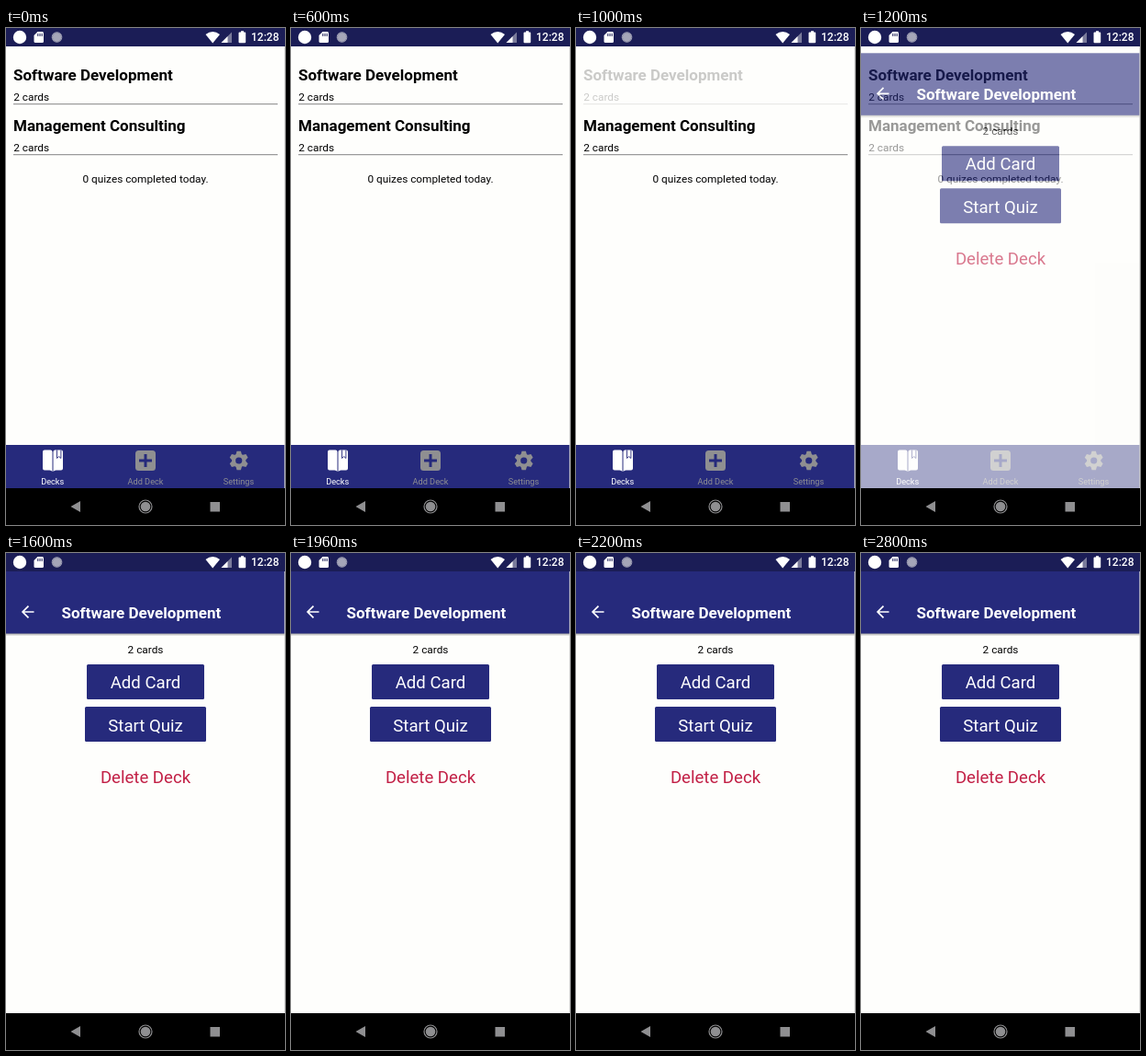
An HTML page that plays this animation: 304 by 540 pixels, repeating every 3200 ms.

```html
<!DOCTYPE html>
<html lang="en">
<head>
<meta charset="utf-8">
<title>Flashcard decks</title>
<style>
  html, body { margin: 0; width: 100%; height: 100%; overflow: hidden; background: #fefefc; }
  svg { display: block; width: 100vw; height: 100vh; }
  text { font-family: Roboto, sans-serif; font-size: 11.82px; }
  .title { font-size: 17px; font-weight: 700; }
  .button { font-size: 18.58px; }
  .tab { font-size: 9.2px; }
  .clock { font-size: 12px; font-weight: 500; }
  .mid { text-anchor: middle; }
  .white { fill: #fff; }
  .navy { fill: #262a7c; }
  .gray { fill: #8f8f91; }
</style>
</head>
<body>
<svg viewBox="0 0 304 540">
  <defs>
    <linearGradient id="shade" x2="0" y2="1">
      <stop stop-color="#000" stop-opacity=".38"/>
      <stop offset="1" stop-color="#000" stop-opacity="0"/>
    </linearGradient>
  </defs>

  <g id="home">
    <rect width="304" height="540" fill="#fefefc"/>
    <g id="pressed">
      <text class="title" x="8" y="57">Software Development</text>
      <text x="8.3" y="79.2">2 cards</text>
      <rect x="8" y="82" width="288" height="1.2" fill="#999"/>
    </g>
    <text class="title" x="8" y="112">Management Consulting</text>
    <text x="8.3" y="134.2">2 cards</text>
    <rect x="8" y="137" width="288" height="1.2" fill="#999"/>
    <text class="mid" x="152" y="168">0 quizes completed today.</text>

    <rect class="navy" y="453" width="304" height="47"/>
    <g class="white">
      <path d="M40 460.5q0-2 2-2H48.5q2 0 2 2V482q-1-1.6-3-1.6H42q-2 0-2-2z"/>
      <path d="M51.5 460.5q0-2 2-2H60q2 0 2 2V478.400q0 2-2 2H54.500q-2 0-3 1.600z"/>
      <text class="tab mid" x="50.700" y="496">Decks</text>
    </g>
    <path d="M55.500 458.500V467.500l2.200-2 2.200 2V458.500" fill="none" stroke="#262a7c" stroke-width=".9"/>
    <g class="gray">
      <rect x="141" y="459" width="22" height="22" rx="3.500"/>
      <text class="tab mid" x="152" y="496">Add Deck</text>
      <g id="gear" transform="translate(253.700 470)"><circle r="7.600"/></g>
      <text class="tab mid" x="253.500" y="496">Settings</text>
    </g>
    <path d="M145 470H159M152 463V477" stroke="#262a7c" stroke-width="3"/>
    <circle class="navy" cx="253.700" cy="470" r="3.600"/>
  </g>

  <g id="deck">
    <rect y="20" width="304" height="487" fill="#fefefc"/>
    <rect y="87" width="304" height="3.500" fill="url(#shade)"/>
    <rect class="navy" y="20" width="304" height="67.500"/>
    <path d="M30.500 64H18.500M24.500 57.600L18.100 64L24.500 70.400" fill="none" stroke="#fff" stroke-width="1.700"/>
    <text class="title white" x="60.500" y="70.700">Software Development</text>
    <text class="mid" x="152" y="108.700">2 cards</text>
    <rect class="navy" x="88" y="121" width="128" height="38" rx="1.500"/>
    <text class="button white mid" x="152" y="147">Add Card</text>
    <rect class="navy" x="86" y="167" width="132" height="38" rx="1.500"/>
    <text class="button white mid" x="152" y="194">Start Quiz</text>
    <text class="button mid" x="152" y="250" fill="#c22046">Delete Deck</text>
  </g>

  <rect x="303.300" y="20" width=".7" height="480" fill="#d4d4d4"/>

  <rect width="304" height="20" fill="#1b1d56"/>
  <g class="white">
    <circle cx="15" cy="10" r="7.200"/>
    <path d="M34.500 4H39.500q1.500 0 1.500 1.500V14.500q0 1.500-1.500 1.500H32q-1.500 0-1.500-1.500V8z"/>
    <path d="M217.500 7Q225.200 1.200 233 7L225.200 16.500z"/>
    <path d="M253.500 5.500q0-1 1-1H256V3.200H259V4.500H260.200q1 0 1 1V15.200q0 1-1 1H254.500q-1 0-1-1z"/>
    <text class="clock" x="267" y="14.300">12:28</text>
  </g>
  <path d="M34.800 6V9M37 6V9M39.200 6V9" stroke="#1b1d56"/>
  <circle cx="55.500" cy="10" r="5.800" fill="#a5a6b8"/>
  <circle cx="55.500" cy="10" r="5" fill="none" stroke="#737597" stroke-dasharray="1.200 1"/>
  <path d="M246 4.500V16H234.500z" fill="#7a7b9b"/>
  <path d="M241.500 9V16H234.500z" class="white"/>

  <rect y="500" width="304" height="40"/>
  <g class="gray">
    <path d="M70.500 520L81 514V526z"/>
    <circle cx="152" cy="520" r="5.300"/>
    <circle cx="152" cy="520" r="7" fill="none" stroke="#8f8f91" stroke-width="1.200"/>
    <rect x="222.500" y="515" width="10.500" height="10.500"/>
  </g>
</svg>
<script>
  const LOOP = 3200, PRESS = 1000, OPENING = 1200, OPEN = 1400;
  const byId = id => document.getElementById(id);
  const pressed = byId('pressed'), deck = byId('deck'), gear = byId('gear');

  for (let i = 0; i < 6; i++) {
    const tooth = document.createElementNS(gear.namespaceURI, 'path');
    tooth.setAttribute('d', 'M-3.400-6L-2.200-10.200H2.200L3.400-6z');
    tooth.setAttribute('transform', `rotate(${i * 60})`);
    gear.append(tooth);
  }

  function draw(t) {
    const opening = t >= OPENING && t < OPEN;
    pressed.setAttribute('opacity', t >= PRESS && t < OPENING ? 0.2 : 1);
    deck.setAttribute('display', t < OPENING ? 'none' : 'inline');
    deck.setAttribute('opacity', opening ? 0.6 : 1);
    deck.setAttribute('transform', `translate(0 ${opening ? 7.3 : 0})`);
  }

  const start = performance.now();
  function tick() {
    draw((performance.now() - start) % LOOP);
    requestAnimationFrame(tick);
  }
  tick();
</script>
</body>
</html>
```
